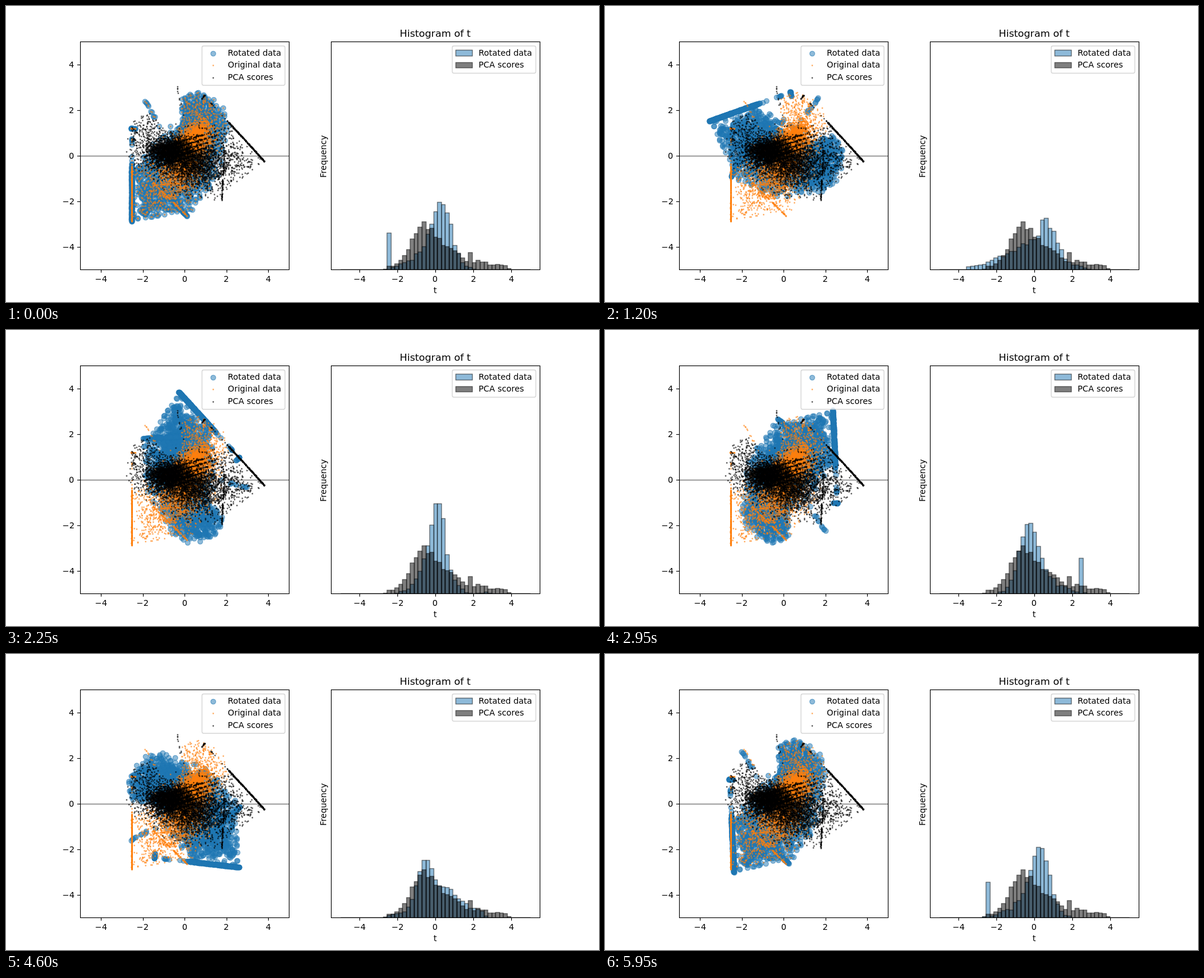
Recreate the animation shown at these times as an HTML page with a canvas. Size 1000 by 500 pixels, loop 6000 ms.

```html
<!DOCTYPE html>
<html>
<head>
<meta charset="utf-8">
<style>
  html, body { margin: 0; width: 100%; height: 100%; overflow: hidden; background: #fff; }
  canvas { display: block; }
</style>
</head>
<body>
<canvas id="stage" width="1000" height="500"></canvas>
<script>
const W = 1000, H = 500, TOP = 60, BOTTOM = 445, MID = 252.5;
const SCATTER = { left: 125, right: 477.27, unit: 35.227 };
const HIST = { left: 547.73, right: 900, unit: 32.025 };
for (const a of [SCATTER, HIST]) a.mid = (a.left + a.right) / 2;
const UNIT_Y = 38.5, DENSITY_Y = 192.5, BINS = 49, BIN = 10 / BINS;
const BLUE = '#1f77b4', ORANGE = '#ff7f0e', BLACK = '#000';
const FRAME_MS = 50, FRAMES = 120, STEP = 3, PCA = 225, COUNT = 5500;

const ctx = document.getElementById('stage').getContext('2d');

function layer(w, h) {
  const c = document.createElement('canvas');
  c.width = w;
  c.height = h;
  return c.getContext('2d');
}

// ---- data cloud ----
let seed = 20240;
function rnd() {
  seed = (seed + 0x6D2B79F5) | 0;
  let t = Math.imul(seed ^ (seed >>> 15), seed | 1);
  t ^= t + Math.imul(t ^ (t >>> 7), t | 61);
  return ((t ^ (t >>> 14)) >>> 0) / 4294967296;
}
const normal = (mean = 0, sd = 1) =>
  mean + sd * Math.sqrt(-2 * Math.log(1 - rnd())) * Math.cos(2 * Math.PI * rnd());

function project([x, y], degrees) {
  const a = degrees * Math.PI / 180;
  return x * Math.cos(a) + y * Math.sin(a);
}
const fromScores = (p, q) => [-(p + q) * Math.SQRT1_2, (q - p) * Math.SQRT1_2];

const outline = new Path2D();
[[-2.53, -2.92], [-.5, -2.5], [.4, -2.4], [1.45, -1.25], [1.85, -.6], [2.1, 1.4], [1.9, 2.1],
 [1.3, 2.6], [.6, 2.77], [-.1, 2.6], [-.2, 1.7], [-1.2, 1.1], [-2, -.1], [-2.53, -.5]]
  .forEach(p => outline.lineTo(...p));

const points = [];
function add(share, draw) {
  for (let n = Math.round(share * COUNT); n > 0;) {
    const p = draw();
    if (ctx.isPointInPath(outline, ...p)) {
      points.push(p);
      n--;
    }
  }
}
// A thin trail of points; bias above 1 crowds them near the start.
function trail(share, x0, y0, x1, y1, spread, bias = 1) {
  for (let n = Math.round(share * COUNT); n > 0; n--) {
    const k = rnd() ** bias;
    points.push([x0 + (x1 - x0) * k + normal(0, spread), y0 + (y1 - y0) * k + normal(0, spread)]);
  }
}

add(.42, () => fromScores(normal(-.74, .52), normal(.2, .32)));
add(.28, () => fromScores(normal(.45, .75), normal(-.42, .48)));
add(.05, () => [normal(-1.4, .8), normal(-1.8, .7)]);
add(.03, () => [normal(.7, .5), normal(2.1, .4)]);
add(.03, () => [-2.53 + 4.63 * rnd(), -2.92 + 5.69 * rnd()]);
for (let k = 0; k < 5; k++) {
  add(.024, () => {
    const p = normal(-.1, 1.1);
    return fromScores(p, .66 - .2 * k + .27 * p + normal(0, .015));
  });
}
trail(.06, -2.52, -2.9, -2.52, -.45, .006, 1.2);
trail(.002, -2.52, -.45, -2.52, .8, .006);
trail(.016, .12, -2.65, -1.5, -1.2, .012);
trail(.005, -1.4, -1.2, -2.1, -2.6, .015);
trail(.002, -1.83, 2.36, -1.2, 1.25, .03);
trail(.003, -2.54, 1.17, -2.28, 1.17, .01, 2);

// ---- drawing helpers ----
const snap = v => Math.round(v) + .5;

function sprite(color, radius) {
  const g = layer(13, 13);
  g.globalAlpha = .5;
  g.fillStyle = g.strokeStyle = color;
  g.lineWidth = 1.39;
  g.arc(6.5, 6.5, radius, 0, 7);
  g.fill();
  g.stroke();
  return g.canvas;
}
const bigBlue = sprite(BLUE, 4.17), tinyOrange = sprite(ORANGE, .69), tinyBlack = sprite(BLACK, .69);

function mark(g, image, x, y) {
  g.drawImage(image, Math.floor(x) - 6, Math.floor(y) - 6);
}
function scatter(g, image, angleX, angleY) {
  for (const p of points) {
    mark(g, image, SCATTER.mid + SCATTER.unit * project(p, angleX), MID - UNIT_Y * project(p, angleY));
  }
}

function box(g, x0, y0, x1, y1, color) {
  const rect = [snap(x0), snap(y0), snap(x1) - snap(x0), snap(y1) - snap(y0)];
  g.save();
  g.globalAlpha = .5;
  g.lineWidth = 1.39;
  g.fillStyle = color;
  g.strokeStyle = BLACK;
  g.fillRect(...rect);
  g.strokeRect(...rect);
  g.restore();
}

function histogram(g, angle, color) {
  const counts = new Array(BINS).fill(0);
  for (const p of points) {
    counts[Math.floor((project(p, angle) + 5) / BIN)]++;
  }
  const edge = k => HIST.mid + HIST.unit * (k * BIN - 5);
  g.save();
  g.beginPath();
  g.rect(HIST.left, TOP, HIST.right - HIST.left, BOTTOM - TOP + .5);
  g.clip();
  counts.forEach((n, i) => {
    const height = DENSITY_Y * n / (points.length * BIN);
    box(g, edge(i), BOTTOM - height, edge(i + 1), BOTTOM, color);
  });
  g.restore();
}

function text(g, str, x, y, anchor = .5, size = 13.89) {
  g.font = size + 'px "DejaVu Sans", sans-serif';
  g.fillStyle = BLACK;
  g.fillText(str, Math.round(x - anchor * g.measureText(str).width), Math.round(y));
}
function line(g, x0, y0, x1, y1) {
  g.beginPath();
  g.moveTo(x0, y0);
  g.lineTo(x1, y1);
  g.stroke();
}
const label = v => String(v).replace('-', '\u2212');

function axes(g, a) {
  g.strokeStyle = BLACK;
  g.lineWidth = 1.11;
  const left = snap(a.left), right = snap(a.right);
  g.strokeRect(left, snap(TOP), right - left, BOTTOM - TOP);
  for (let v = -4; v <= 4; v += 2) {
    const x = a.mid + v * a.unit;
    line(g, snap(x), BOTTOM + .5, snap(x), BOTTOM + 5.4);
    text(g, label(v), x, 466);
    if (a === SCATTER) {
      const y = MID - v * UNIT_Y;
      line(g, a.left, snap(y), a.left - 4.86, snap(y));
      text(g, label(v), a.left - 9.7, y + 5.2, 1);
    }
  }
}

function legend(g, x, width, height, textX, names) {
  g.save();
  g.globalAlpha = .8;
  g.fillStyle = '#fff';
  g.strokeStyle = '#ccc';
  g.lineWidth = 1.39;
  g.beginPath();
  g.roundRect(x, 67.5, width, height, 2.8);
  g.fill();
  g.stroke();
  g.restore();
  names.forEach((name, i) => text(g, name, textX, 84 + 20.4 * i, 0));
}

// ---- parts that never change, drawn above the moving dots ----
const front = layer(W, H);
scatter(front, tinyOrange, 0, 90);
scatter(front, tinyBlack, PCA, 135);
front.strokeStyle = 'rgba(0,0,0,.5)';
front.lineWidth = 1.39;
line(front, SCATTER.left, snap(MID), SCATTER.right, snap(MID));
axes(front, SCATTER);
legend(front, 330.5, 140, 66.5, 374, ['Rotated data', 'Original data', 'PCA scores']);
[bigBlue, tinyOrange, tinyBlack].forEach((image, i) => mark(front, image, 349, 80.4 + 20.4 * i));

histogram(front, PCA, BLACK);
axes(front, HIST);
legend(front, 752.5, 141, 46, 797, ['Rotated data', 'PCA scores']);
[BLUE, BLACK].forEach((color, i) => {
  const y = 74.2 + 20.4 * i;
  box(front, 758, y, 786, y + 9.72, color);
});
text(front, 'Histogram of t', HIST.mid, 52, .5, 16.67);
text(front, 't', HIST.mid, 485);
front.translate(540, 254);
front.rotate(-Math.PI / 2);
text(front, 'Frequency', 0, 0);

// ---- animation ----
let shown = -1;
function tick() {
  const frame = Math.floor(performance.now() / FRAME_MS) % FRAMES;
  if (frame !== shown) {
    shown = frame;
    const angle = frame * STEP;
    ctx.fillStyle = '#fff';
    ctx.fillRect(0, 0, W, H);
    scatter(ctx, bigBlue, angle, angle + 90);
    histogram(ctx, angle, BLUE);
    ctx.drawImage(front.canvas, 0, 0);
  }
  requestAnimationFrame(tick);
}
tick();
</script>
</body>
</html>
```
